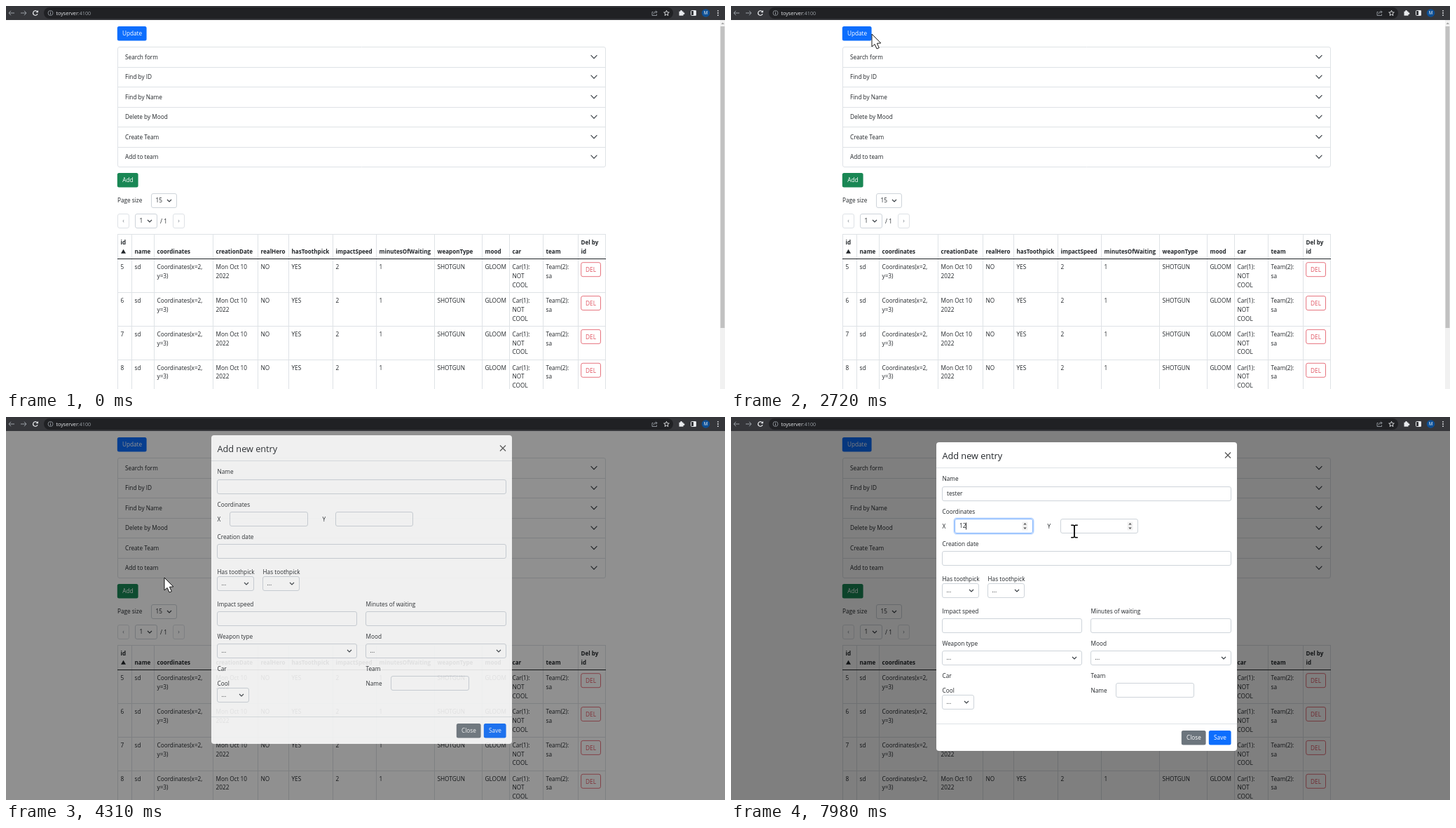
Animation of 1026 by 546 pixels, one loop 8000 ms. Source, as an HTML page with a canvas:

```html
<!DOCTYPE html>
<html lang="en">
<head>
<meta charset="utf-8">
<title>Entry table</title>
<style>
  html, body { margin: 0; width: 100%; height: 100%; overflow: hidden; background: #fff; }
  canvas { display: block; width: 1026px; height: 546px; }
</style>
</head>
<body>
<canvas id="stage" width="1026" height="546"></canvas>
<script>
const screen2d = document.getElementById('stage').getContext('2d');
const layer = Object.assign(document.createElement('canvas'), { width: 1026, height: 546 });
const layer2d = layer.getContext('2d');
let g = screen2d;

const LOOP = 8000, LOCK = 4165, TICK = 70;
const FONT = '"Open Sans", "Noto Sans", sans-serif';
const INK = '#212529', LINE = '#dee2e6', BLUE = '#0d6efd';
const HEADS = ['id', 'name', 'coordinates', 'creationDate', 'realHero', 'hasToothpick', 'impactSpeed',
  'minutesOfWaiting', 'weaponType', 'mood', 'car', 'team', 'Del by|id'];
const EDGES = [159, 179, 211, 295, 359, 403, 466, 528, 611, 679, 718, 766, 816, 855];
const firstRows = [5, 6, 7, 8].map(id =>
  [id, 'sd', 'Coordinates(x=2,|y=3)', 'NO', 2, 1, 'SHOTGUN', 'GLOOM', 'Car(1):|NOT|COOL', 'Team(2):|sa']);
const ROWS = [...firstRows,
  [9, 'sd', 'Coordinates(x=12,|y=2)', 'YES', 21, 31, 'MACHINE_GUN', 'FRENZY', 'Car(12):|NOT|COOL', 'Team(14):|12'],
  [10, 'ar', 'Coordinates(x=31,|y=21)', 'YES', 12, 31, 'SHOTGUN', 'FRENZY', 'Car(13):|COOL', 'Team(15):|21'],
  [11, 'ae', 'Coordinates(x=1,|y=2)', 'YES', 12, 13, 'MACHINE_GUN', 'GLOOM', 'Car(14):|COOL', 'Team(17):|tutu']];

// time, x, y, pointer shape
const POINTER = [
  [480, 380, 420, arrow], [930, 380, 422, arrow], [1490, 585, 450, arrow], [1690, 660, 445, arrow],
  [1900, 660, 445, arrow], [2500, 206, 78, arrow], [2720, 201, 40, arrow], [2860, 186, 40, hand],
  [3050, 180, 42, hand], [3350, 206, 80, arrow], [3550, 206, 80, arrow], [4000, 178, 252, hand],
  [4170, 178, 252, hand], [4240, 202, 241, arrow], [4310, 226, 229, arrow], [4500, 300, 150, arrow],
  [4680, 375, 112, beam], [4900, 377, 114, beam], [5140, 377, 197, beam], [5340, 377, 197, beam],
  [5750, 377, 114, beam], [6710, 377, 114, beam], [7180, 395, 160, beam], [7400, 395, 160, beam],
  [7900, 490, 163, beam], [8000, 490, 163, beam]];

const clamp = v => Math.max(0, Math.min(1, v));
const smooth = (t, a, b) => { const p = clamp((t - a) / (b - a)); return p * p * (3 - 2 * p); };
const typed = (word, times, t) => word.slice(0, times.filter(at => at <= t).length);

function text(s, x, y, { size = 8.25, weight = 400, color = INK, align = 'left' } = {}) {
  g.font = `${weight} ${size}px ${FONT}`;
  g.fillStyle = color;
  g.textAlign = align;
  String(s).split('|').forEach((part, i) => g.fillText(part, x, y + size * 0.36 + i * 12.9));
}
function rect(x, y, w, h, color) { g.fillStyle = color; g.fillRect(x, y, w, h); }
function box(x, y, w, h, { fill, stroke, r = 2.5, width = 1 }) {
  if (fill) {
    g.beginPath();
    g.roundRect(x, y, w, h, r);
    g.fillStyle = fill; g.fill();
  }
  if (stroke) {
    g.beginPath();
    g.roundRect(x + 0.5, y + 0.5, w - 1, h - 1, r);
    g.strokeStyle = stroke; g.lineWidth = width; g.stroke();
  }
}
function path(points, { fill, stroke, width = 1, close = false }) {
  g.beginPath();
  points.forEach(([x, y]) => g.lineTo(x, y));
  if (close) g.closePath();
  if (fill) { g.fillStyle = fill; g.fill(); }
  if (stroke) { g.strokeStyle = stroke; g.lineWidth = width; g.stroke(); }
}
function disc(x, y, r, color) {
  g.beginPath(); g.arc(x, y, r, 0, 7); g.fillStyle = color; g.fill();
}
function chevron(x, y, w = 3) {
  path([[x - w, y - w / 2], [x, y + w / 2], [x + w, y - w / 2]], { stroke: '#343a40', width: 1.1 });
}
function button(label, x, y, w, fill) {
  box(x - 0.2, y - 0.1, w - 0.2, 20.5, { fill });
  text(label, x + w / 2, y + 10.5, { color: '#fff', align: 'center' });
}
function select(value, x, y, w) {
  box(x, y, w, 21, { fill: '#fff', stroke: '#ced4da' });
  text(value, x + 6.5, y + 10.5);
  chevron(x + w - 11, y + 10.5);
}

function table() {
  const top = 325, headEnd = 360, red = '#e0505e';
  HEADS.forEach((head, i) => {
    const two = head.includes('|');
    text(head, EDGES[i] + 4.5, i === 0 || two ? 337 : 350, { size: 8.07, weight: 700 });
  });
  path([[164, 352.8], [167.5, 346.8], [171, 352.8]], { fill: INK });
  rect(159, top, 697, 1, LINE);
  let y = headEnd;
  for (const [id, name, place, hero, speed, wait, weapon, mood, car, team] of ROWS) {
    [id, name, place, 'Mon Oct 10|2022', hero, 'YES', speed, wait, weapon, mood, car, team]
      .forEach((value, i) => text(value, EDGES[i] + 4.5, y + 12));
    box(820.2, y + 5.2, 28.8, 21, { stroke: red, width: 0.8 });
    text('DEL', 834.5, y + 16, { color: red, align: 'center' });
    y += car.split('|').length === 3 ? 47.85 : 34.95;
    rect(159, Math.round(y), 697, 1, LINE);
  }
  EDGES.forEach(x => rect(x, top, 1, y - top, LINE));
  rect(159, headEnd, 697, 1, INK);
}

function page(scroll, hoverUpdate, hoverAdd) {
  g.save();
  g.translate(0, -Math.round(scroll));
  button('Update', 159, 29, 42, hoverUpdate ? '#0b5ed7' : BLUE);
  box(159, 58, 697, 172, { stroke: LINE });
  ['Search form', 'Find by ID', 'Find by Name', 'Delete by Mood', 'Create Team', 'Add to team']
    .forEach((label, i) => {
      const y = 72.8 + 28.5 * i;
      if (i) rect(159, Math.round(y - 14.6), 697, 1, LINE);
      text(label, 170, y);
      chevron(839, y - 0.4, 4.4);
    });
  if (hoverAdd) box(158, 237, 32, 23, { stroke: 'rgba(25,135,84,.3)', width: 2 });
  button('Add', 159, 238, 30, hoverAdd ? '#157347' : '#198754');
  text('Page size', 159, 277.5);
  select('15', 207, 267, 37);
  [['‹', 159], ['›', 238]].forEach(([sign, x]) => {
    box(x, 296, 17, 21, { stroke: LINE });
    text(sign, x + 8.5, 306, { color: '#6c757d', align: 'center' });
  });
  select('1', 184, 296, 32);
  text('/ 1', 220, 307);
  table();
  g.restore();
}

function scrollbar(scroll) {
  rect(1019, 20, 7, 526, '#f1f1f1');
  rect(1019.5, 29 + scroll * 0.803, 6, 430, '#c1c1c1');
  path([[1020.5, 26], [1022.7, 23.5], [1025, 26]], { fill: scroll > 1 ? '#505050' : '#a3a3a3' });
}

function toolbar() {
  const pale = '#e8eaed', grey = '#9aa0a6';
  rect(0, 0, 1026, 20, '#35363a');
  box(54, 2, 898, 16, { fill: '#202124', r: 8 });
  [[8, 1, grey], [25, -1, grey]].forEach(([x, d, stroke]) => {
    path([[x + 4 * d, 10], [x - 4 * d, 10]], { stroke });
    path([[x - d, 6.8], [x - 4 * d, 10], [x - d, 13.2]], { stroke });
  });
  g.beginPath(); g.arc(42, 10, 3.3, 0.4, 5.5); g.strokeStyle = pale; g.lineWidth = 1.2; g.stroke();
  path([[42.5, 9.3], [46, 9.3], [46, 6]], { fill: pale });
  g.beginPath(); g.arc(63.5, 10, 3.5, 0, 7); g.strokeStyle = grey; g.lineWidth = 0.8; g.stroke();
  rect(63, 9.5, 1, 2.8, grey);
  rect(63, 7.7, 1, 1, grey);
  text('toyserver', 71.5, 10, { size: 7.2, color: pale });
  const end = 71.5 + g.measureText('toyserver').width;
  text(':4100', end, 10, { size: 7.2, color: grey });
  path([[923.5, 8.5], [922, 8.5], [922, 13.5], [928.5, 13.5], [928.5, 11.5]], { stroke: grey, width: 0.9 });
  path([[924, 11.5], [925.5, 8.5], [929, 8.5]], { stroke: grey, width: 0.9 });
  path([[927, 6.5], [929, 8.5], [927, 10.5]], { stroke: grey, width: 0.9 });
  const star = Array.from({ length: 10 }, (_, i) => {
    const a = (i / 5 - 0.5) * Math.PI, r = i % 2 ? 1.8 : 4;
    return [942.5 + r * Math.cos(a), 10.3 + r * Math.sin(a)];
  });
  path(star, { stroke: pale, width: 0.9, close: true });
  rect(960.5, 7.7, 6, 6, pale);
  disc(963.5, 7.5, 1.4, pale);
  disc(967, 10.7, 1.4, pale);
  box(977, 6, 8, 8, { stroke: pale, r: 1 });
  rect(981, 6.5, 4, 7, pale);
  disc(998.5, 10, 5.8, '#0d4f94');
  text('M', 998.5, 10, { size: 6.2, color: '#fff', align: 'center' });
  [6.8, 10, 13.2].forEach(y => disc(1016, y, 0.9, pale));
}

function field(x, y, w, { value = '', focus = false, spin = false } = {}) {
  if (focus) box(x - 1, y - 1, w + 2, 23, { stroke: 'rgba(13,110,253,.3)', r: 3.5, width: 2 });
  box(x, y, w, 21, { fill: '#fff', stroke: focus ? '#86b7fe' : '#ced4da' });
  text(value, x + 7, y + 10.5);
  if (focus) rect(Math.round(x + 7 + g.measureText(value).width), y + 5.5, 0.8, 10, '#000');
  if (spin) {
    const cx = x + w - 11.5, cy = y + 10.5;
    rect(cx - 4, cy - 6, 8, 12, '#f1f1f1');
    [-1, 1].forEach(d => path([[cx - 2.2, cy + 2 * d], [cx, cy + 4.6 * d], [cx + 2.2, cy + 2 * d]], { fill: '#505050' }));
  }
}

function dialog(t) {
  box(293, 36, 429, 440, { fill: '#fff', r: 4 });
  text('Add new entry', 301.5, 55.3, { size: 12.7, weight: 500 });
  path([[705, 50.5], [713, 58.5]], { stroke: '#555', width: 1.2 });
  path([[713, 50.5], [705, 58.5]], { stroke: '#555', width: 1.2 });
  rect(293, 72, 429, 1, LINE);
  rect(293, 437, 429, 1, LINE);
  [['Name', 301.5, 88.5], ['Coordinates', 301.5, 134.7], ['X', 301.5, 155.7], ['Y', 451.5, 155.7],
   ['Creation date', 301.5, 181], ['Has toothpick', 301.5, 231], ['Has toothpick', 366.5, 231],
   ['Impact speed', 301.5, 277], ['Minutes of waiting', 513.5, 277], ['Weapon type', 301.5, 323],
   ['Mood', 513.5, 323], ['Car', 301.5, 369], ['Team', 513.5, 369], ['Cool', 301.5, 390],
   ['Name', 513.5, 390]].forEach(label => text(...label));
  field(301, 99, 413, {
    value: typed('tester', [5500, 5760, 6300, 6500, 6850, 6950], t),
    focus: t >= 4720 && t < 7400 });
  field(319, 145, 112, { value: typed('12', [7650, 7750], t), focus: t >= 7400, spin: t >= 7050 });
  field(470, 145, 111, { spin: t >= 7820 });
  field(301, 191, 413);
  field(301, 287, 200);
  field(513, 287, 201);
  field(549, 379, 112);
  [[301, 237, 53], [366, 237, 53], [301, 333, 200], [513, 333, 201], [301, 396, 46]]
    .forEach(place => select('...', ...place));
  button('Close', 643, 447, 35, '#6c757d');
  button('Save', 682, 447, 32, BLUE);
}

// The dialog fades as one group, so it is painted on its own layer first.
function modal(t) {
  const age = Math.floor((t - LOCK) / TICK) * TICK - 10;
  const slide = -27 * (1 - clamp(age / 300)) ** 1.7;
  layer2d.clearRect(0, 0, 1026, 546);
  g = layer2d;
  dialog(t);
  g = screen2d;
  g.globalAlpha = clamp(age / 150);
  rect(0, 20, 1026, 526, 'rgba(0,0,0,.5)');
  g.drawImage(layer, 0, Math.round(slide));
  g.globalAlpha = 1;
}

function arrow() {
  path([[0, 0], [0, 18], [4.1, 14.5], [7.1, 21], [10.3, 19.6], [7.4, 13.3], [12.8, 12.9]],
    { fill: '#fff', stroke: '#000', width: 0.9, close: true });
}
function hand() {
  g.beginPath();
  g.moveTo(-1.8, 13);
  g.lineTo(-1.8, 1);
  g.quadraticCurveTo(0, -1.8, 1.8, 1);
  g.lineTo(1.8, 7);
  [4.4, 7, 9.6].forEach((x, i) => { g.quadraticCurveTo(x - 1, 5 + i * 0.7, x, 8 + i * 0.7); });
  g.lineTo(9.6, 15);
  g.quadraticCurveTo(9, 20, 7, 24);
  g.lineTo(-2, 24);
  g.quadraticCurveTo(-4, 19, -7.5, 14.5);
  g.quadraticCurveTo(-6.5, 10.5, -1.8, 14.5);
  g.closePath();
  g.fillStyle = '#fff'; g.fill();
  g.strokeStyle = '#000'; g.lineWidth = 0.9; g.stroke();
  [1.8, 4.4, 7].forEach(x => path([[x, 7.5], [x, 12]], { stroke: '#000', width: 0.7 }));
}
function beam() {
  path([[0, -8], [0, 8]], { stroke: '#000', width: 1.8 });
  [-1, 1].forEach(d => path([[-4.8, 8.8 * d], [-1.5, 8.8 * d], [0, 7.6 * d], [1.5, 8.8 * d], [4.8, 8.8 * d]],
    { stroke: '#000', width: 1.5 }));
}

function pointerAt(t) {
  const i = POINTER.findLastIndex(k => k[0] <= t);
  if (i < 0) return null;
  const [a, x, y, shape] = POINTER[i], [b, nx, ny] = POINTER[i + 1] || POINTER[i];
  const p = b > a ? smooth(t, a, b) : 0;
  return { x: x + (nx - x) * p, y: y + (ny - y) * p, shape };
}

function draw(t) {
  const scroll = 117 * (smooth(t, 80, 820) - smooth(t, 1720, 2200));
  const pointer = pointerAt(t), open = t >= LOCK + TICK;
  const pointing = pointer && pointer.shape === hand;
  rect(0, 0, 1026, 546, '#fff');
  page(scroll, pointing && pointer.y < 60, pointing && pointer.y > 200 && !open);
  if (t < LOCK) scrollbar(scroll);
  if (open) modal(t);
  toolbar();
  if (pointer) {
    g.save();
    g.translate(pointer.x, pointer.y);
    pointer.shape();
    g.restore();
  }
}

const start = performance.now();
function tick() {
  draw((performance.now() - start) % LOOP);
  requestAnimationFrame(tick);
}
tick();
</script>
</body>
</html>
```
